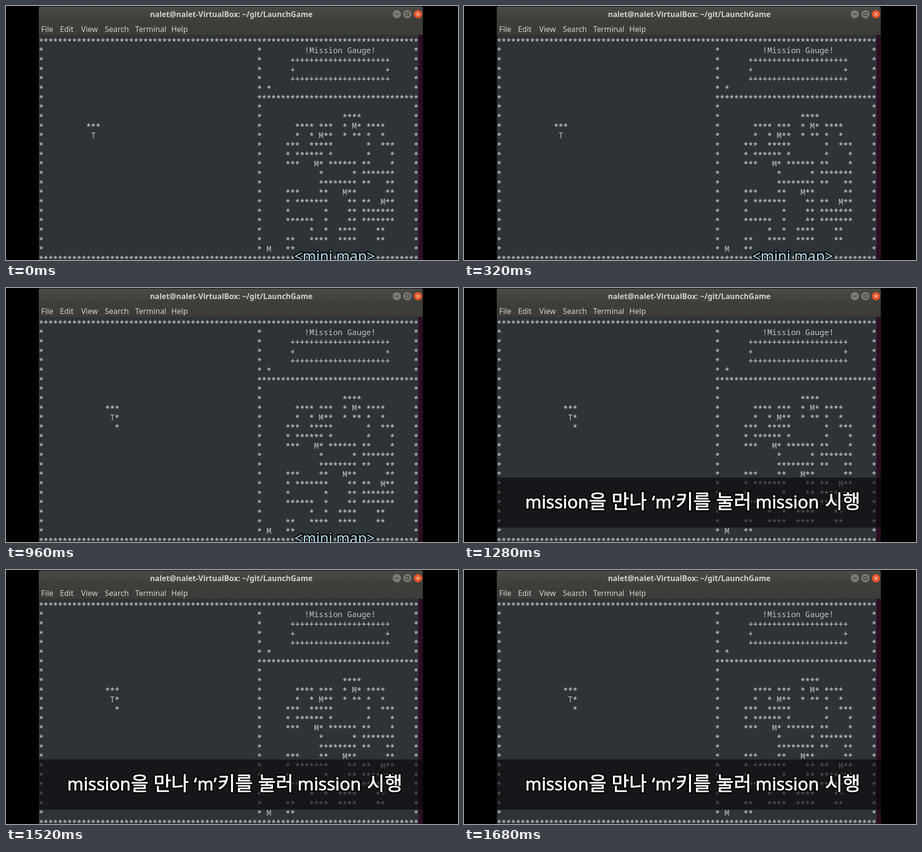
Recreate the animation shown at these times as an HTML page with a canvas. Size 938 by 528 pixels, loop 2.32 s.

```html
<!DOCTYPE html>
<html lang="ko">
<head>
<meta charset="utf-8">
<title>Terminal game</title>
<style>
  html, body { margin: 0; width: 100%; height: 100%; overflow: hidden; background: #000; }
  canvas { display: block; }
</style>
</head>
<body>
<canvas id="stage" width="938" height="528"></canvas>
<script>
const ctx = document.getElementById('stage').getContext('2d');
const LOOP = 2320;
const CAPTION_AT = 1280;
const MONO = '16.4px "Noto Sans Mono", "DejaVu Sans Mono", monospace';
const SANS = '"Noto Sans", "Open Sans", sans-serif';
const KOREAN = '"Noto Sans CJK KR", "Noto Sans CJK JP", "Noto Sans CJK", sans-serif';

// Centre of the first cell and the cell size of the terminal grid.
const GRID = { x: 73, y: 70, w: 9.848, h: 19.68 };

// Each run: row, first column, text.
const RUNS = [
  [0, 0, '*'.repeat(80)],
  [1, 56, '!Mission Gauge!'],
  [2, 53, '+'.repeat(21)],
  [3, 53, '+' + ' '.repeat(19) + '+'],
  [4, 53, '+'.repeat(21)],
  [5, 48, '*'],
  [6, 47, '*'.repeat(32)],
  [8, 64, '****'],
  [9, 54, '**** ***  * M* ****'],
  [10, 54, '*  * M**  * ** *  *'],
  [11, 52, '***  *****       *  ***'],
  [12, 52, '* ****** *       *    *'],
  [13, 52, '***   M* ****** **    *'],
  [14, 59, '*      * *******'],
  [15, 59, '******** **   **'],
  [16, 52, '***    **   M**      **'],
  [17, 52, '* *******    ** **  M**'],
  [18, 52, '*       *    ** *******'],
  [19, 52, '******  *    ** *******'],
  [20, 57, '*  *  ****    **'],
  [21, 52, '**   ****  ****    **'],
  [22, 48, 'M   **'],
  [23, 0, '*'.repeat(80)]
];
for (let row = 1; row < 23; row++) {
  for (const col of [0, 46, 79]) RUNS.push([row, col, '*']);
}

// Time of each step and the player's column from then on.
const STEPS = [[0, 11], [80, 12], [320, 13], [720, 14], [960, 15]];

const MENU = [['File', 74], ['Edit', 113], ['View', 156], ['Search', 205], ['Terminal', 268], ['Help', 344]];

const CAPTION = [
  ['mission', 130], ['을', 260], ['만나', 309], ['‘', 390], ['m', 400], ['’', 431],
  ['키를', 441], ['눌러', 524], ['mission', 608], ['시행', 750]
];

const metrics = {};
function glyph(ch, col, row) {
  const m = metrics[ch] || (metrics[ch] = ctx.measureText(ch));
  const x = GRID.x + col * GRID.w;
  const y = GRID.y + row * GRID.h;
  if (ch === '*' || ch === '+') {
    const dx = (m.actualBoundingBoxLeft - m.actualBoundingBoxRight) / 2;
    const dy = (m.actualBoundingBoxAscent - m.actualBoundingBoxDescent) / 2;
    const sink = ch === '+' ? 2.5 : 0;
    ctx.fillText(ch, x + dx, y + dy + sink);
    ctx.strokeText(ch, x + dx, y + dy + sink);
  } else {
    ctx.fillText(ch, x - m.width / 2, y + 8);
  }
}

function run(row, col, text) {
  [...text].forEach((ch, i) => { if (ch !== ' ') glyph(ch, col + i, row); });
}

// Left edge of the ink at x.
function inkX(text, x) {
  return x + ctx.measureText(text).actualBoundingBoxLeft;
}

function line(...p) {
  ctx.beginPath();
  for (let i = 0; i < p.length; i += 4) {
    ctx.moveTo(p[i], p[i + 1]);
    ctx.lineTo(p[i + 2], p[i + 3]);
  }
  ctx.stroke();
}

function button(x, fill) {
  ctx.beginPath();
  ctx.arc(x, 17, 8.6, 0, Math.PI * 2);
  ctx.fillStyle = fill;
  ctx.fill();
}

function drawWindow() {
  ctx.fillStyle = '#000';
  ctx.fillRect(0, 0, 938, 528);

  const bar = ctx.createLinearGradient(0, 1, 0, 60);
  bar.addColorStop(0, '#4c4a46');
  bar.addColorStop(0.5, '#3f3e3a');
  bar.addColorStop(1, '#3c3b37');
  ctx.fillStyle = bar;
  ctx.beginPath();
  ctx.roundRect(68, 1, 797, 60, [4, 4, 0, 0]);
  ctx.fill();

  ctx.fillStyle = '#2d3336';
  ctx.fillRect(68, 60, 788, 468);
  ctx.fillStyle = '#2b0d23';
  ctx.fillRect(856, 60, 9, 468);

  ctx.fillStyle = '#d6d2ca';
  ctx.font = 'bold 15.7px ' + SANS;
  ctx.textAlign = 'center';
  ctx.fillText('nalet@nalet-VirtualBox: ~/git/LaunchGame', 467.5, 22.5);
  ctx.textAlign = 'left';
  ctx.font = '15.8px ' + SANS;
  for (const [label, x] of MENU) ctx.fillText(label, inkX(label, x), 53.5);

  button(811, '#7d7b75');
  button(833, '#7d7b75');
  button(855, '#e5562b');
  ctx.strokeStyle = '#3a3935';
  ctx.lineWidth = 1.4;
  line(807, 17, 815, 17);
  ctx.strokeRect(829.7, 13.7, 6.6, 6.6);
  ctx.strokeStyle = '#f3d9cd';
  line(852, 14, 858, 20, 858, 14, 852, 20);
}

function drawPlayer(t) {
  const col = STEPS.filter(s => s[0] <= t).pop()[1];
  run(9, col - 1, '***');
  run(10, col, 'T');
  if (col === 14) run(10, 15, 'M');
  if (col === 15) {
    run(10, 16, '*');
    run(11, 16, '*');
  }
}

function drawTerminal(t) {
  ctx.font = MONO;
  ctx.fillStyle = '#c0c4c3';
  ctx.strokeStyle = 'rgba(192, 196, 195, 0.6)';
  ctx.lineWidth = 0.6;
  for (const r of RUNS) run(...r);
  drawPlayer(t);
}

function drawMapLabel() {
  ctx.font = '30px ' + SANS;
  ctx.textAlign = 'center';
  ctx.lineJoin = 'round';
  ctx.lineWidth = 5;
  ctx.strokeStyle = '#050709';
  ctx.strokeText('<mini map>', 682, 530.5);
  ctx.fillStyle = '#b4dcee';
  ctx.fillText('<mini map>', 682, 530.5);
  ctx.textAlign = 'left';
}

function drawCaption() {
  ctx.fillStyle = 'rgba(5, 5, 9, 0.6)';
  ctx.fillRect(68, 394, 797, 104);
  ctx.lineJoin = 'round';
  const words = CAPTION.map(([word, x]) => {
    const font = word >= '가' ? '500 40px ' + KOREAN : '500 36.3px ' + SANS;
    ctx.font = font;
    return [word, inkX(word, x), font];
  });
  const strokeAll = (color, width) => {
    ctx.strokeStyle = color;
    ctx.lineWidth = width;
    for (const [word, x, font] of words) {
      ctx.font = font;
      ctx.strokeText(word, x, 458);
    }
  };
  strokeAll('#000', 6);
  strokeAll('#fff', 0.9);
  ctx.fillStyle = '#fff';
  for (const [word, x, font] of words) {
    ctx.font = font;
    ctx.fillText(word, x, 458);
  }
}

function draw(t) {
  drawWindow();
  drawTerminal(t);
  if (t < CAPTION_AT) drawMapLabel();
  else drawCaption();
}

const start = performance.now();
function tick() {
  draw((performance.now() - start) % LOOP);
  requestAnimationFrame(tick);
}
tick();
</script>
</body>
</html>
```
